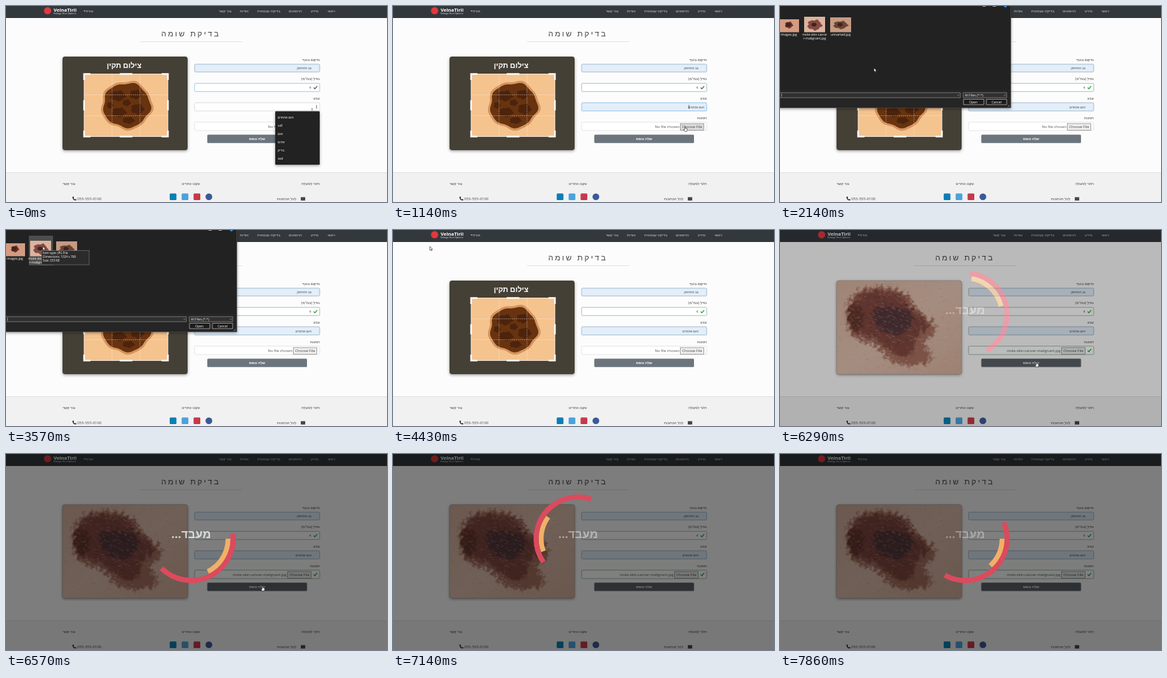
An HTML page for the animation above (8 s loop, 600 by 310 pixels).

```html
<!DOCTYPE html>
<html lang="he">
<head>
<meta charset="utf-8">
<title>בדיקת שומה</title>
<style>
html, body { margin: 0; width: 100%; height: 100%; overflow: hidden; background: #fcfcfc; }
svg { display: block; width: 100vw; height: 100vh; }
text { font: 5.8px "Open Sans", "Liberation Sans", sans-serif; fill: #444; }
.he { direction: rtl; }
.mid { text-anchor: middle; }
.end { text-anchor: end; }
.nav text { fill: #c6c8ca; }
.field { fill: #e3eefa; stroke: #7fa3b4; stroke-width: .7; }
.value { font-size: 5.1px; }
.file { font-size: 5.8px; fill: #555; }
.dark text { fill: #fff; font-size: 5.1px; }
.check { fill: none; stroke-width: 1.4; }
</style>
</head>
<body>
<svg viewBox="0 0 600 310" preserveAspectRatio="none">
  <defs>
    <filter id="shadow" x="-10%" y="-10%" width="120%" height="125%">
      <feDropShadow dx="0" dy="1.5" stdDeviation="2" flood-opacity=".4"/>
    </filter>
    <filter id="ragged" x="-15%" y="-15%" width="130%" height="130%">
      <feGaussianBlur stdDeviation="2.2" result="blurred"/>
      <feTurbulence type="fractalNoise" baseFrequency=".16" numOctaves="3" seed="4"/>
      <feDisplacementMap in="blurred" scale="20" xChannelSelector="R" yChannelSelector="G"/>
    </filter>
    <clipPath id="cardClip"><rect x="89" y="80" width="197" height="148" rx="4"/></clipPath>
    <linearGradient id="skin" x2="1" y2="1">
      <stop offset="0" stop-color="#d8b3a0"/><stop offset=".5" stop-color="#dfc0ae"/><stop offset="1" stop-color="#d6b09c"/>
    </linearGradient>
    <path id="tick" class="check" d="M484.5 129l2 2 3.6-4.4"/>
  </defs>

  <rect width="600" height="310" fill="#fcfcfc"/>
  <g class="nav">
    <rect width="600" height="19" fill="#33383d"/>
    <circle cx="65.5" cy="7.5" r="5.7" fill="#e0393e"/>
    <text x="75" y="9" style="font-size:7.6px;font-weight:700;fill:#fff">VelnaTiril</text>
    <text x="75" y="13.3" style="font-size:3.6px;fill:#eee">Enlarge Your Options</text>
    <path d="M122.3 7h3l-1.5 1.9z" fill="#c6c8ca"/>
    <g id="nav"></g>
  </g>
  <text class="he mid" x="291" y="48" style="font-size:12.4px;letter-spacing:2.8px">בדיקת שומה</text>
  <path d="M211 56.5H372" stroke="#e2e2e2"/>

  <g id="cropCard">
    <rect x="89" y="80" width="197" height="148" rx="4" fill="#453f34" filter="url(#shadow)"/>
    <text class="he mid" x="186" y="98" style="font-size:11.6px;font-weight:700;fill:#fff">צילום תקין</text>
    <rect x="123" y="107.5" width="132" height="99" fill="#f5c38e" stroke="#fff" stroke-width=".8"/>
    <g id="mole"></g>
    <path d="M167 108V206M211 108V206M123 140.5H255M123 173.5H255" stroke="#fff" stroke-width=".7" stroke-dasharray="2 1.2" opacity=".6"/>
    <path d="M123 117V107.5H133M245 107.5H255V117M255 197V206.5H245M133 206.5H123V197M179 107.5h20M179 206.5h20M123 149v16M255 149v16" fill="none" stroke="#fff" stroke-width="2.6"/>
  </g>
  <g id="photo">
    <rect x="89" y="80" width="197" height="148" rx="4" fill="#d8b29b" filter="url(#shadow)"/>
    <g clip-path="url(#cardClip)">
      <rect x="89" y="80" width="197" height="148" fill="url(#skin)"/>
      <g filter="url(#ragged)">
        <path d="M103 143C102 115 118 90 146 90C168 88 192 92 204 108C210 122 224 129 236 142C250 152 248 168 228 173C226 186 243 196 237 207C222 217 190 217 174 206C160 197 156 186 146 181C122 176 105 165 103 143Z" fill="#a8705f"/>
        <path d="M107 142C106 117 122 96 148 96C168 96 190 98 200 114C208 128 230 138 232 152C228 164 214 164 212 178C214 194 204 204 186 199C170 190 162 176 146 171C124 168 109 160 107 142Z" fill="#83493f"/>
        <path d="M146 127C164 114 198 118 208 136C213 153 196 168 178 165C158 163 146 150 146 127Z" fill="#57393c"/>
        <ellipse cx="120" cy="140" rx="12" ry="20" fill="#67382f"/>
      </g>
      <g id="texture" fill="none" stroke-width="1"></g>
    </g>
    <rect x="89" y="80" width="197" height="148" rx="4" fill="none" stroke="#a8968c" stroke-width=".6"/>
  </g>

  <g id="labels"></g>
  <rect class="field" x="297" y="92" width="197" height="12.3" rx="1.5"/>
  <text class="he value" x="481" y="100">גב התחתון</text>
  <rect class="field" id="size" x="297" y="122.3" width="197" height="13" rx="1.5" style="fill:#fff"/>
  <text class="value end" x="480.5" y="131">4</text>
  <use id="sizeTick" href="#tick"/>
  <rect class="field" id="color" x="297" y="153" width="197" height="13" rx="1.5"/>
  <text class="he value" id="colorText" y="161.6">חום אדמדם</text>
  <path id="caret" stroke="#222" stroke-width=".7"/>
  <rect x="297" y="183.7" width="197" height="13.3" rx="1.5" fill="#fff" stroke="#ddd" stroke-width=".8" id="fileBox"/>
  <g id="picker">
    <text class="file end" id="fileName" x="451" y="193.2"></text>
    <rect x="452.5" y="186" width="37" height="10.6" fill="#efefef" stroke="#777" stroke-width=".7" id="choose"/>
    <text class="mid" x="471" y="193.4" style="font-size:5.9px">Choose File</text>
  </g>
  <use id="fileTick" href="#tick" y="61.5" stroke="#25a244"/>
  <rect id="submit" x="317" y="203.5" width="157" height="13.2" rx="1.5" fill="#6c757d" stroke-width=".7"/>
  <text class="he mid" x="395.5" y="212" style="font-size:5.5px;font-weight:600;fill:#fff">שלח טופס</text>

  <path d="M0 263.5H600V310H0z" fill="#f1f1f1"/>
  <path d="M0 263.5H600" stroke="#e0e0e0"/>
  <g id="footer"></g>
  <path d="M106 303l1.6-.7 1 2-.9.8q.7 1.4 2 2l.8-.9 1.9 1-.7 1.4q-5.6 0-5.7-5.6z" transform="translate(-1.4 -1)" fill="#222"/>
  <text x="112.2" y="307" style="font-size:6px">055-555-0100</text>
  <path d="M464.5 302.5h6.5v5h-6.5zM466 304h3.7M466 305.7h3.7" fill="#333" stroke="#777" stroke-width=".6"/>
  <g id="social"></g>

  <g id="suggest" class="dark" style="font-weight:600">
    <rect x="424" y="166.5" width="70" height="84.5" rx="1" fill="#222" filter="url(#shadow)"/>
  </g>

  <g id="dialog" class="dark">
    <rect x="-5" y="-5" width="368.5" height="166" fill="#202020" stroke="#555" stroke-width=".7" filter="url(#shadow)"/>
    <path d="M0 132H363V160.6H0z" fill="#252525"/>
    <path d="M319 0h5M335 0h5" stroke="#ddd" stroke-width="1.4"/>
    <circle cx="355" cy="0" r="2.2" fill="#3a8fe0"/>
    <rect id="hover" x="36" y="9" width="38" height="47" fill="#4d4d4d"/>
    <g id="files"></g>
    <g fill="#303030" stroke="#999" stroke-width=".7">
      <path d="M-2 137H284V145H-2zM288.5 137H357V145H288.5z"/>
      <path d="M289 147.5h32v8.5h-32zM325 147.5h32v8.5h-32z" fill="#1c1c1c" stroke="#ccc"/>
    </g>
    <path d="M279.5 140.3l1.4 1.4 1.4-1.4M352.5 140.3l1.4 1.4 1.4-1.4" fill="none" stroke="#ccc" stroke-width=".6"/>
    <path d="M2.5 138.7v4.8" stroke="#ddd" stroke-width=".6"/>
    <text x="291" y="143">All Files (*.*)</text>
    <text class="mid" x="304.5" y="153.6">Open</text>
    <text class="mid" x="341" y="153.6">Cancel</text>
    <path d="M358.5 159.5l3-3M360 159.5l1.5-1.5" stroke="#aaa" stroke-width=".6"/>
    <g id="tooltip">
      <rect x="56" y="32.5" width="75" height="22.5" fill="#2b2b2b" stroke="#888" stroke-width=".6"/>
    </g>
  </g>

  <g id="overlay">
    <rect width="600" height="310" fill="#000" opacity=".5"/>
    <g fill="none" transform="translate(291.5 134)">
      <circle id="outer" r="66" stroke="#dc4a5d" stroke-width="8" pathLength="360" stroke-dasharray="142 218"/>
      <circle id="inner" r="58.2" stroke="#f1b067" stroke-width="7.6" pathLength="360"/>
    </g>
    <text id="busy" class="he mid" x="291.5" y="133" style="font-size:18.3px;font-weight:700;fill:#fff">מעבד...</text>
  </g>

  <g id="cursor" stroke="#111" stroke-width=".6" fill="#fff">
    <path id="arrow" d="M0 0v6l1.4-1.2 1 2.1 1-.5-1-2h1.9z"/>
    <path id="hand" d="M-.7 0q.7-1 1.4 0v2.5l2.5.7q.6 2.4-.7 4.3h-3q-1.4-1.3-2-3l1.8.3z"/>
    <path id="beam" d="M-1.2-2.8h2.4M0-2.8v5.6M-1.2 2.8h2.4" fill="none" stroke="#444"/>
  </g>
</svg>
<script>
const $ = id => document.getElementById(id);
const set = (el, attrs) => { for (const k in attrs) el.setAttribute(k, attrs[k]); return el; };
const add = (parent, tag, attrs) =>
  $(parent).appendChild(set(document.createElementNS('http://www.w3.org/2000/svg', tag), attrs));
const label = (parent, text, x, y, cls = 'he') => { add(parent, 'text', { x, y, class: cls }).textContent = text; };

[['ראשי', 518.5], ['מידע', 492], ['הרופאים', 466], ['בדיקה עצמאית', 432], ['אודות', 382], ['צור קשר', 355], ['אורח', 137.5]]
  .forEach(([s, x]) => label('nav', s, x, 10));
['מיקום בגוף', 'גודל (במ"מ)', 'צבע', 'תמונה'].forEach((s, i) => label('labels', s, 494, 86.7 + i * 30.6));
[['צור קשר', 109, 283], ['עקבו אחרינו', 305.5, 283], ['חזור למעלה', 494, 283], ['לכל הכתבות', 457, 307]]
  .forEach(([s, x, y]) => label('footer', s, x, y));
['#0b7fb3', '#4ba3dc', '#c7394a', '#3b5998'].forEach((fill, i) =>
  add('social', 'rect', { x: 257.8 + i * 18.8, y: 296.5, width: 10.6, height: 10.6, rx: i < 3 ? 1.5 : 5.3, fill }));
['חום אדמדם', 'sdf', 'חום', 'אדום', 'בדיק', 'asd'].forEach((s, i) => label('suggest', s, 428, 177.8 + i * 13.1, ''));
['Item type: JPG File', 'Dimensions: 1024 x 768', 'Size: 335 KB'].forEach((s, i) => {
  label('tooltip', s, 58, 38.3 + i * 5.8, '');
  $('tooltip').lastChild.style.fontSize = '4.7px';
});

const random = (seed => () => (seed = seed * 16807 % 2147483647) / 2147483647)(41);

// closed outline with a wavy edge
function blob(parent, cx, cy, rx, ry, fill, wave = .04) {
  const points = Array.from({ length: 72 }, (_, i) => {
    const a = i * Math.PI / 36, r = 1 + wave * (Math.sin(5 * a + 1) + .6 * Math.sin(9 * a));
    return (cx + rx * r * Math.cos(a)).toFixed(1) + ',' + (cy + ry * r * Math.sin(a)).toFixed(1);
  });
  return add(parent, 'polygon', { points: points.join(' '), fill });
}
set(blob('mole', 190, 157, 40, 38, '#d7945e'), { stroke: '#b97a4a', 'stroke-width': .8, 'stroke-dasharray': '1 1' });
blob('mole', 190, 157, 37, 35, '#68330f');
[[176, 142, 12, 8], [204, 140, 9, 7], [207, 163, 10, 8], [178, 168, 11, 7], [193, 181, 9, 5], [190, 153, 6, 5], [164, 157, 5, 5]]
  .forEach(([x, y, rx, ry]) => blob('mole', x, y, rx, ry, '#4c230c', .1));

// fine skin lines over the whole photo, denser and darker on the lesion
function skinLines(count, cx, cy, rx, ry, colors, opacity) {
  for (let i = 0; i < count; i++) {
    const a = random() * 6.28, r = Math.sqrt(random());
    const x = cx + rx * r * Math.cos(a), y = cy + ry * r * Math.sin(a);
    add('texture', 'path', {
      d: `M${x.toFixed(1)} ${y.toFixed(1)}q2 ${(random() * 3).toFixed(1)} 4 ${(random() * 4 - 1).toFixed(1)}`,
      stroke: colors[i % colors.length], opacity
    });
  }
}
skinLines(260, 187, 154, 120, 95, ['#c4947f', '#ecd2c2'], .4);
skinLines(300, 167, 142, 58, 42, ['#8f4b40', '#3a2630', '#c08a78', '#5d6478'], .45);

[[-3, 21, 33, 'images.jpg', 14], [38, 17, 33, 'mole-skin-cance', 54.5], [79, 18, 33, 'unnamed.jpg', 95.5]].forEach(([x, y, width, name, mid], i) => {
  add('files', 'rect', { x, y, width, height: 41.5 - y, fill: ['#d49b83', '#dbb39e', '#c79a82'][i] });
  blob('files', mid, 30, [6, 11, 11][i], [5, 8, 6][i], ['#6b2f24', '#84493f', '#694335'][i], .1);
  blob('files', mid - 1, 29.5, 4, 3, '#3b2423');
  label('files', name, mid, 47, 'mid');
});
label('files', 'r-malignant.jpg', 54.5, 52.6, 'mid');

// time, x, y
const cursorPath = [
  [0, 482, 165], [143, 480, 167], [430, 446, 176], [571, 446, 176], [1000, 460, 191], [1571, 460, 191],
  [2140, 148, 98], [2290, 148, 98], [2860, 58, 26], [4430, 58, 26], [4570, 62, 30], [5286, 203, 132],
  [5429, 225, 143], [6143, 404, 209], [8000, 404, 209]
];
function cursorAt(t) {
  const i = cursorPath.findIndex((p, n) => n && t <= p[0]);
  const [t0, x0, y0] = cursorPath[i - 1], [t1, x1, y1] = cursorPath[i];
  const k = (t - t0) / (t1 - t0), e = k * k * (3 - 2 * k);
  return [x0 + (x1 - x0) * e, y0 + (y1 - y0) * e];
}
const show = (id, on) => { $(id).style.display = on ? '' : 'none'; };

function draw(t) {
  const picked = t > 560, loaded = t > 4560, checked = t > 6130;
  const focused = t < 1280, dialog = t > 1560 && t < 4420;
  show('suggest', !picked);
  show('colorText', picked);
  set($('colorText'), { x: focused ? 490 : 481 });
  show('caret', focused);
  set($('caret'), { d: picked ? 'M466 156.5v6' : 'M489 156.5v6' });
  $('color').style.fill = picked ? '' : '#fff';
  $('color').style.stroke = picked ? (focused ? '#62aee0' : '') : '#ccc';
  $('size').style.stroke = t < 290 ? '#6cb4dc' : '#7fa58f';
  set($('sizeTick'), { stroke: focused ? '#4b6259' : '#25a244' });
  $('choose').style.fill = t > 990 && t < 1560 ? '#dcdcdc' : '';

  show('dialog', dialog);
  show('hover', t > 2700);
  show('tooltip', t > 3420);

  show('photo', loaded);
  show('cropCard', !loaded);
  $('fileName').textContent = loaded ? 'mole-skin-cancer-malignant.jpg' : 'No file chosen';
  show('fileTick', checked);
  set($('picker'), { transform: `translate(${checked ? -9 : 0} 0)` });
  set($('fileBox'), { stroke: checked ? '#7fae8c' : '#ddd' });
  set($('submit'), checked ? { fill: '#5b6268', stroke: '#a3a9ae' } : { fill: '#6c757d', stroke: 'none' });

  show('overlay', t > 6270);
  set($('overlay'), { opacity: Math.min(1, Math.max(0, (t - 6140) / 280)) });
  const since = (t - 6571.4) / 1285.7;
  const turn = since * 344, length = Math.max(20, 63 - 16 * since);
  set($('outer'), { transform: `rotate(${turn - 7})` });
  set($('inner'), { transform: `rotate(${turn + 63 - length})`, 'stroke-dasharray': `${length} ${360 - length}` });
  set($('busy'), { opacity: .53 + .2 * Math.cos(since * 3 * Math.PI) });

  const [x, y] = cursorAt(t);
  const beam = t < 200, hand = (t > 990 && t < 1560) || t > 6130;
  set($('cursor'), { transform: `translate(${x} ${y})` });
  show('cursor', t < 6990);
  show('beam', beam);
  show('hand', hand);
  show('arrow', !beam && !hand);
}

const rate = 7, frames = 56;
function tick() {
  const frame = Math.floor(performance.now() * rate / 1000 + .03) % frames;
  draw(frame * 1000 / rate);
  requestAnimationFrame(tick);
}
tick();
</script>
</body>
</html>
```
